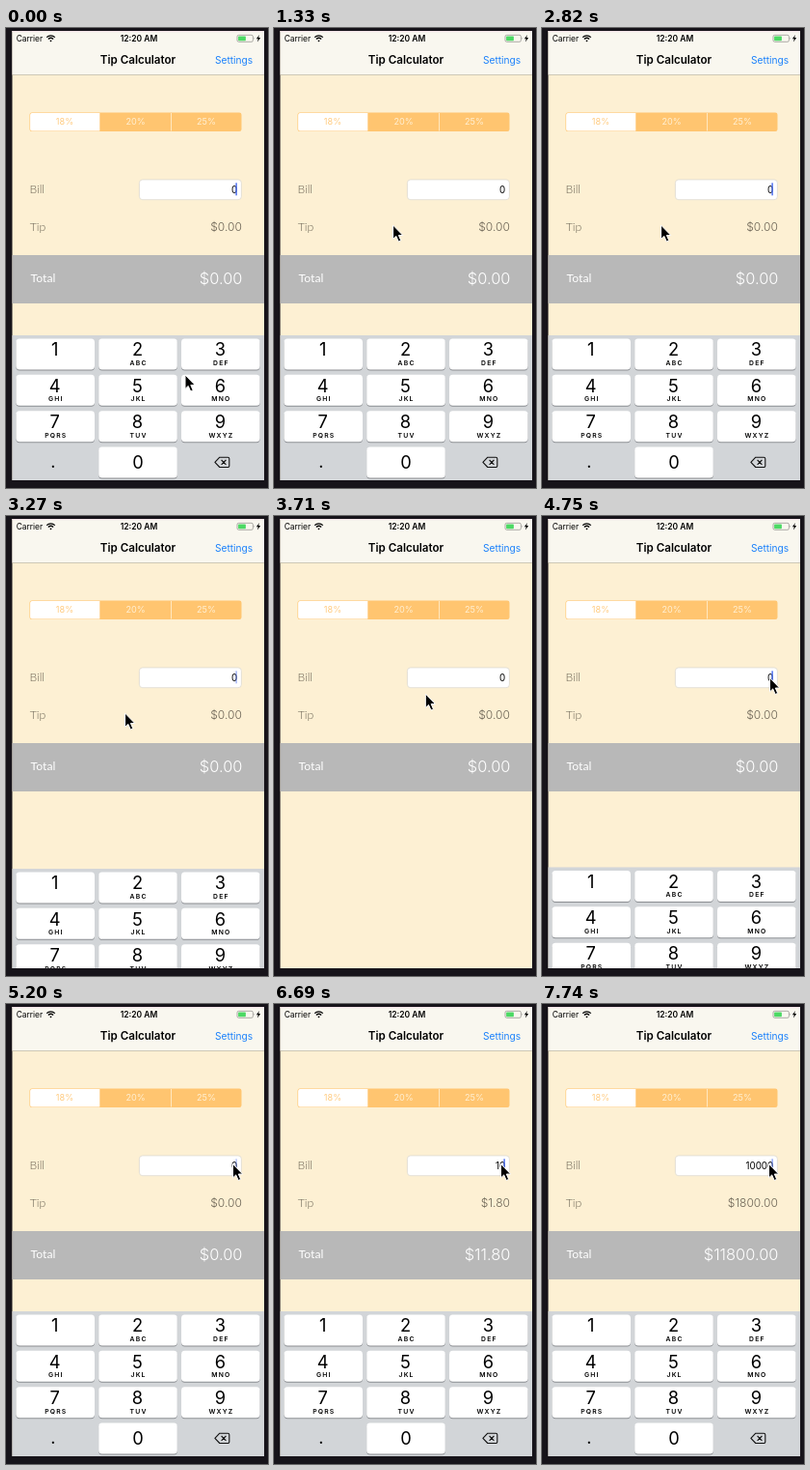
An HTML page for the animation above (8000 ms loop, 272 by 476 pixels).

```html
<!DOCTYPE html>
<html lang="en">
<head>
<meta charset="utf-8">
<title>Tip Calculator</title>
<style>
  html, body { margin: 0; width: 100%; height: 100%; overflow: hidden; background: #17141a; }
  svg { display: block; width: 100vw; height: 100vh; }
  text { font-family: Inter, "Liberation Sans", sans-serif; }
  .mid { text-anchor: middle; }
  .end { text-anchor: end; }
  .label { font-family: Lato, sans-serif; font-weight: 300; font-size: 12.2px; fill: #6b6455; }
  .digit { font-size: 18.3px; text-anchor: middle; }
  .abc { font-size: 6.8px; font-weight: 600; letter-spacing: 1.2px; text-anchor: middle; }
  .seg { font-size: 9.1px; text-anchor: middle; fill: #fff0d4; }
</style>
</head>
<body>
<svg viewBox="0 0 272 476" xmlns="http://www.w3.org/2000/svg">
  <defs><clipPath id="screen"><rect x="6.5" y="3" width="261.5" height="465"/></clipPath></defs>
  <rect width="272" height="476" fill="#17141a"/>
  <g clip-path="url(#screen)">
    <rect x="6" y="3" width="262" height="465" fill="#fdf0d3"/>

    <!-- status and navigation bars -->
    <rect x="6" y="3" width="262" height="45" fill="#f9f7ef"/>
    <rect x="6" y="3" width="262" height="1.2" fill="#f6e4e8"/>
    <rect x="6" y="48" width="262" height=".8" fill="#c4beb0"/>
    <text x="10.7" y="13.8" font-size="8.4">Carrier</text>
    <g fill="none" stroke="#000" stroke-width="1.3">
      <path d="M42.2 9.6a6.2 6.2 0 0 1 8.6 0M43.9 11.5a3.8 3.8 0 0 1 5.2 0"/>
      <path d="M46.5 14.4l-1.2-1.4a1.8 1.8 0 0 1 2.4 0z" fill="#000" stroke="none"/>
    </g>
    <text x="138" y="13.9" class="mid" font-size="8.5" font-weight="600">12:20 AM</text>
    <rect x="240" y="7.3" width="16.4" height="7" rx="1.6" fill="none" stroke="#8d8c88" stroke-width=".7"/>
    <rect x="241.1" y="8.4" width="7.8" height="4.8" rx=".7" fill="#4cd964"/>
    <path d="M257.3 9.5q1.2 1.3 0 2.6z" fill="#8d8c88"/>
    <path d="M263 7l-3.1 4.3h1.9l-.8 3.3 3.2-4.5h-2z"/>
    <text x="137" y="37.1" class="mid" font-size="11.6" font-weight="600">Tip Calculator</text>
    <text x="256.2" y="36.8" class="end" font-size="10.2" fill="#1a80fb">Settings</text>

    <!-- tip rate -->
    <rect x="24.5" y="87.5" width="220" height="19.5" rx="2.2" fill="#ffc570"/>
    <path d="M97.3 88.1H27a1.9 1.9 0 0 0-1.9 1.9v14.5a1.9 1.9 0 0 0 1.9 1.9h70.3z" fill="#fff"/>
    <path d="M171.5 88v18.5" stroke="#fff0d4" stroke-width=".8"/>
    <text x="61" y="100.4" class="seg" style="fill:#ffcb80">18%</text>
    <text x="134.5" y="100.4" class="seg">20%</text>
    <text x="208" y="100.4" class="seg">25%</text>

    <!-- amounts -->
    <text x="24.4" y="170.8" class="label">Bill</text>
    <text x="24.8" y="209.6" class="label">Tip</text>
    <rect x="138.4" y="156.9" width="106" height="20.8" rx="3.4" fill="#fff" stroke="#dedad0" stroke-width=".8"/>
    <text id="bill" x="240.2" y="170.6" class="end" font-size="9.8"></text>
    <rect id="caret" x="238.4" y="160.3" width="1.4" height="13" fill="#4569ee"/>
    <text id="tip" x="244.9" y="209.5" class="end" font-size="12" font-weight="300" fill="#6b6455"></text>
    <rect x="6" y="235" width="262" height="50" fill="#b8b8b8"/>
    <text x="25.5" y="262.6" class="label" style="fill:#fff;font-weight:400">Total</text>
    <text id="total" x="245.4" y="264.6" class="end" font-size="16.4" font-weight="300" fill="#fff"></text>

    <g id="keyboard"><rect x="6" y="318" width="262" height="152" fill="#d2d5d8"/></g>
  </g>
  <path id="pointer" d="M0 0V14.4L3.2 11.4 5.7 17 8.2 15.9 5.8 10.5H10.2Z" fill="#000" stroke="#fff" stroke-width="1" stroke-linejoin="round"/>
</svg>
<script>
const LOOP = 8000, TICK = 148.8, KEYBOARD_H = 151;
const $ = id => document.getElementById(id);
const bill = $('bill'), tip = $('tip'), total = $('total');
const caret = $('caret'), keyboard = $('keyboard'), pointer = $('pointer');

// [time, value]: each value holds until the next
const CARET = [[0, 1], [290, .5], [440, 0], [880, 1], [1180, .5], [1320, 0], [1770, .5], [1920, 1],
  [2370, .5], [2520, 0], [2820, 1], [3270, .5], [3400, 0], [4750, 1], [5200, .4], [5350, 0],
  [5790, 1], [6830, .5], [6980, 0], [7280, .6]];
const BILL = [[0, 0], [6090, 1], [6690, 10], [7140, 100], [7580, 1000], [7730, 10000]];

// [time, x, y]
const PATH = [[0, 186, 359], [300, 166, 374], [600, 112, 408], [750, 73, 394], [893, 71, 345],
  [1190, 124, 221], [1339, 123.6, 204], [3274, 123.6, 204], [3720, 157.3, 184], [4017, 214, 149],
  [4314, 236.5, 167.5], [4762, 236.5, 167.5], [5059, 235.5, 165.5], [LOOP, 235.5, 165.5]];

function held(list, t) {
  let value = list[0][1];
  for (const [at, v] of list) if (t >= at) value = v;
  return value;
}

function pointAt(t) {
  let i = 1;
  while (i < PATH.length - 1 && PATH[i][0] < t) i++;
  const [t0, x0, y0] = PATH[i - 1], [t1, x1, y1] = PATH[i];
  const p = (t - t0) / (t1 - t0);
  return [x0 + (x1 - x0) * p, y0 + (y1 - y0) * p];
}

function keyboardShift(t) {
  if (t < 3260) return 0;
  if (t < 4740) return KEYBOARD_H * (1 - Math.exp((3240 - t) / 90));
  if (t < 5150) return KEYBOARD_H * Math.exp((4650 - t) / 93);
  return 0;
}

function add(tag, attrs, text) {
  const el = document.createElementNS('http://www.w3.org/2000/svg', tag);
  for (const name in attrs) el.setAttribute(name, attrs[name]);
  if (text) el.textContent = text;
  keyboard.append(el);
}

function buildKeyboard() {
  const letters = ['', 'ABC', 'DEF', 'GHI', 'JKL', 'MNO', 'PQRS', 'TUV', 'WXYZ'];
  const key = (x, y) => {
    add('rect', { x, y: y + 1, width: 81.6, height: 32, rx: 3.6, fill: '#8b8e92' });
    add('rect', { x, y, width: 81.6, height: 32, rx: 3.6, fill: '#fff' });
  };
  letters.forEach((abc, i) => {
    const x = 10.4 + i % 3 * 85.8, y = 321.4 + Math.floor(i / 3) * 37.4, mid = x + 40.8;
    key(x, y);
    add('text', { x: mid - .5, y: y + 17.8, class: 'digit' }, i + 1);
    if (abc) add('text', { x: mid + .6, y: y + 27.6, class: 'abc' }, abc);
  });
  key(96.2, 433.6);
  add('text', { x: 137, y: 456.2, class: 'digit' }, '0');
  add('text', { x: 49, y: 454.5, class: 'digit' }, '.');
  add('path', {
    d: 'M221.8 444.2H230.3a1.5 1.5 0 0 1 1.5 1.5V453a1.5 1.5 0 0 1-1.5 1.5H221.8L216.9 449.4ZM223.6 447l4.8 4.8m0-4.8l-4.8 4.8',
    fill: 'none', stroke: '#111', 'stroke-width': 1.1, 'stroke-linejoin': 'round'
  });
}

function draw(time) {
  // the screen refreshes in coarse ticks
  const t = Math.floor((time % LOOP + 15) / TICK) * TICK;
  const amount = held(BILL, t);
  bill.textContent = amount;
  tip.textContent = '$' + (amount * .18).toFixed(2);
  total.textContent = '$' + (amount * 1.18).toFixed(2);
  caret.setAttribute('opacity', held(CARET, t));
  const shift = keyboardShift(t);
  keyboard.setAttribute('transform', `translate(0 ${shift.toFixed(2)})`);
  keyboard.setAttribute('visibility', shift > KEYBOARD_H - 1.5 ? 'hidden' : 'visible');
  pointer.setAttribute('transform', `translate(${pointAt(t).map(n => n.toFixed(2)).join(' ')})`);
}

buildKeyboard();
const start = performance.now();
function loop() {
  draw(performance.now() - start);
  requestAnimationFrame(loop);
}
loop();
</script>
</body>
</html>
```
